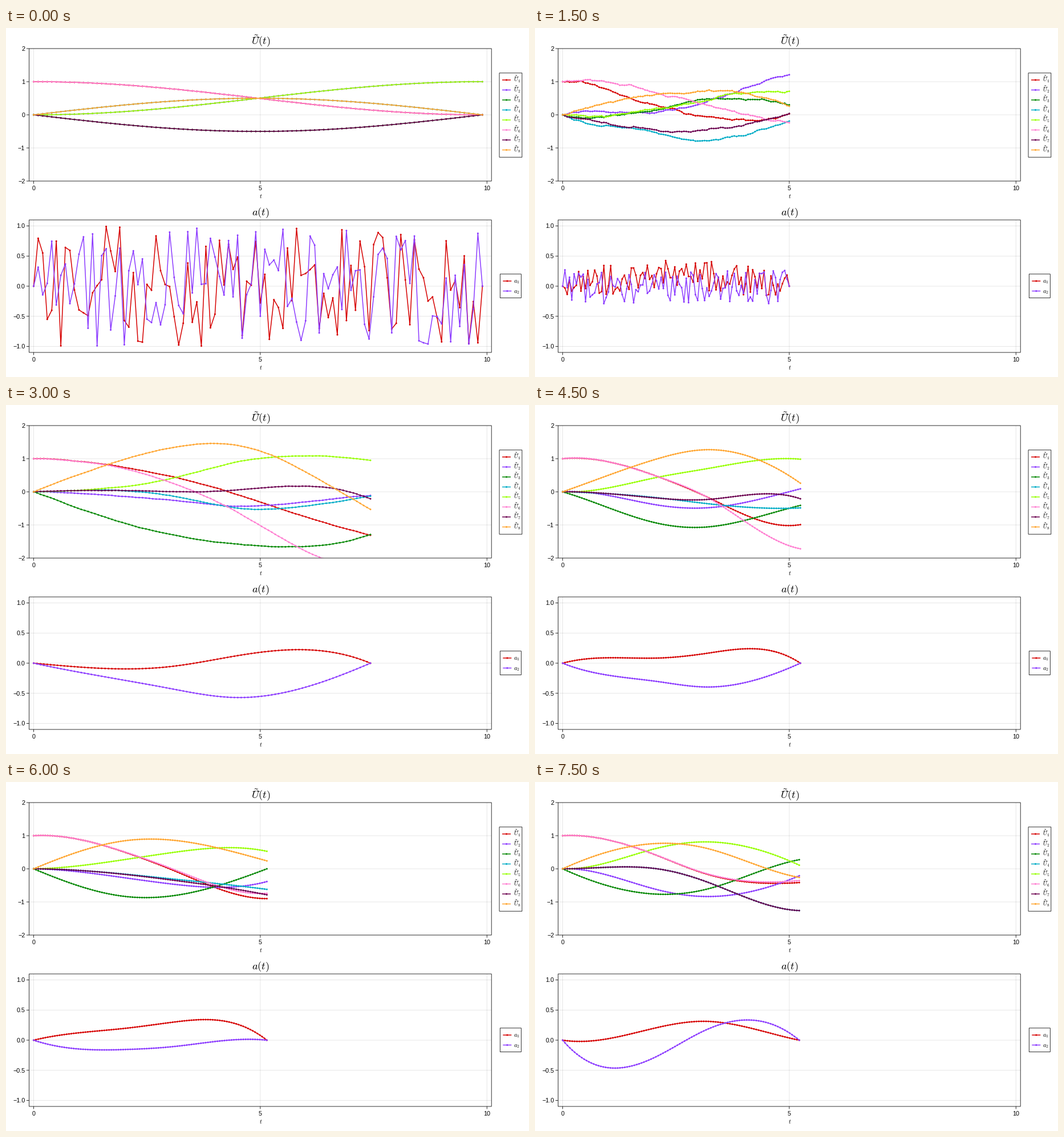
Recreate the animation shown at these times as a matplotlib script. Size 917x611 px, loop 8000 ms.

```python
import numpy as np
import matplotlib.pyplot as plt
from matplotlib.animation import FuncAnimation
from matplotlib.patches import Rectangle

plt.rcParams["font.family"] = "Liberation Sans"
plt.rcParams["mathtext.fontset"] = "cm"

W, H, DPI = 917, 611, 100
PX = 72 / DPI
N = 100
S = np.linspace(0, 1, N)
EDGE = 0.8 * PX
LINE, DOT = 1.5 * PX, (3 * PX) ** 2
COLORS = ["#d60000", "#8c3bff", "#018700", "#00acc6",
          "#97ff00", "#ff7ed1", "#6b004f", "#ffa52f"]
rng = np.random.default_rng(7)


def spline(*y):
    """Not-a-knot cubic spline through evenly spaced key points."""
    y = np.array(y)
    n = len(y)
    m, r = np.zeros((n, n)), np.zeros(n)
    m[0, :3] = m[-1, -3:] = 1, -2, 1
    for i in range(1, n - 1):
        m[i, i - 1:i + 2] = 1, 4, 1
        r[i] = 6 * (y[i - 1] - 2 * y[i] + y[i + 1])
    c = np.linalg.solve(m, r)
    u = S * (n - 1)
    k = np.minimum(u.astype(int), n - 2)
    b = u - k
    a = 1 - b
    return (a * y[k] + b * y[k + 1]
            + ((a**3 - a) * c[k] + (b**3 - b) * c[k + 1]) / 6)


def from_one(*y):
    return spline(1, *y)


def from_zero(*y):
    return spline(0, *y)


def control(*y):
    return spline(0, *y, 0)


def noise(mean, spread):
    y = mean * np.sin(np.pi * S) + rng.uniform(-spread, spread, N)
    y[[0, -1]] = 0
    return y


def wander(curves, step):
    """Add a random walk that starts and ends at zero."""
    walks = rng.normal(0, step, (len(curves), N)).cumsum(axis=1)
    walks -= walks[:, :1]
    return [c + w - S * w[-1] for c, w in zip(curves, walks)]


def paired(u1, u2, u3, u4, gaps):
    """The second column mirrors the first and drifts apart by the gaps."""
    second = [-u2, u1, u4, -u3]
    return [u1, u2, u3, u4] + [u + g * S**3 for u, g in zip(second, gaps)]


def guess():
    fall = (1 + np.cos(np.pi * S)) / 2
    bow = np.sin(np.pi * S) / 2
    return 9.9, [fall, 1 - fall, -bow, bow] * 1 + [
        1 - fall, fall, -bow, bow, noise(0, 1), noise(0, 1)]


def rough():
    curves = [from_one(.74, .34, .08, -.09, .03),
              from_zero(.08, .06, .27, .76, 1.21),
              from_zero(-.10, .08, .37, .46, .30),
              from_zero(-.33, -.46, -.68, -.52, -.19),
              from_zero(.06, .17, .40, .63, .71),
              from_one(.89, .67, .30, -.07, -.24),
              from_zero(-.26, -.39, -.35, -.26, .04),
              from_zero(.30, .58, .66, .62, .26)]
    return 5.0, wander(curves, .013) + [noise(.18, .25), noise(-.03, .28)]


def stretched():
    curves = [from_one(.85, .49, -.06, -.72, -1.31),
              from_zero(-.10, -.27, -.44, -.31, -.11),
              from_zero(-.73, -1.28, -1.57, -1.65, -1.29),
              from_zero(.04, -.12, -.49, -.44, -.13),
              from_zero(.10, .39, .88, 1.07, .95),
              from_one(.83, .31, -.59, -1.76, -2.25),
              from_zero(.05, .02, .07, .17, -.21),
              from_zero(.75, 1.29, 1.405, .65, -.53)]
    return 7.43, wander(curves, .003) + [control(-.085, -.06, .12, .224),
                                         control(-.215, -.415, -.57, -.41)]


def smooth():
    return 5.245, [from_one(.895, .46, -.13, -.79, -.99),
                   from_zero(-.12, -.40, -.485, -.27, .09),
                   from_zero(-.50, -.95, -1.065, -.80, -.41),
                   from_zero(-.06, -.18, -.35, -.475, -.485),
                   from_zero(.13, .44, .69, .93, .985),
                   from_one(.895, .46, -.13, -1.05, -1.72),
                   from_zero(-.06, -.19, -.235, -.08, -.21),
                   from_zero(.52, 1.0, 1.27, 1.03, .26),
                   control(.09, .085, .16, .24),
                   control(-.205, -.305, -.395, -.29)]


def calm():
    return 5.145, paired(from_one(.88, .48, -.05, -.62, -.90),
                         from_zero(-.095, -.28, -.465, -.56, -.385),
                         from_zero(-.53, -.84, -.81, -.49, 0),
                         from_zero(-.05, -.165, -.31, -.455, -.62),
                         (.145, .16, -.165, .24)) + [
        control(.125, .20, .30, .327), control(-.148, -.154, -.106, -.013)]


def settled():
    return 5.22, paired(from_one(.86, .40, -.14, -.41, -.415),
                        from_zero(-.21, -.63, -.835, -.68, -.21),
                        from_zero(-.53, -.765, -.63, -.16, .275),
                        from_zero(.05, 0, -.37, -.93, -1.26),
                        (-.10, .06, 0, .015)) + [
        control(.03, .21, .313, .195), control(-.46, -.265, .16, .333)]


STATES = [make() for make in (guess, rough, stretched, smooth, calm, settled)]

fig = plt.figure(figsize=(W / DPI, H / DPI), dpi=DPI, facecolor="white")
stage = fig.add_axes([0, 0, 1, 1], zorder=5)
stage.set(xlim=(0, W), ylim=(H, 0))
stage.axis("off")


def label(x, y, s, size, ha="center"):
    stage.text(x, y, s, fontsize=size * PX, ha=ha, va="baseline")


def rule(xs, ys):
    stage.plot(xs, ys, color="black", lw=EDGE, snap=False, solid_capstyle="butt")


def box(x, y, w, h, fill="none"):
    stage.add_patch(Rectangle((x, y), w, h, fc=fill, ec="black", lw=EDGE,
                              snap=False))


def panel(top, lim, ticks, fmt):
    left, width, height = 40.5, 810.7, 232
    base = top + height
    ax = fig.add_axes([left / W, 1 - base / H, width / W, height / H])
    ax.set(xlim=(-0.1, 10.1), ylim=(-lim, lim))
    ax.axis("off")
    box(left, top, width, height)
    for x in (0, 5, 10):
        px = left + (x + 0.1) / 10.2 * width
        ax.axvline(x, color="black", alpha=0.12, lw=EDGE, snap=False, zorder=1)
        rule([px, px], [base, base + 4.6])
        label(px, base + 16.3, str(x), 10.7)
    for v in ticks:
        py = top + height * (lim - v) / (2 * lim)
        ax.axhline(v, color="black", alpha=0.12, lw=EDGE, snap=False, zorder=1)
        rule([left - 4.6, left], [py, py])
        label(33.3, py + 3.8, fmt.format(v).replace("-", "\u2212"), 10.7, "right")
    label(446.5, base + 29.5, "$t$", 10.7)
    return ax


def legend(x, y, w, h, first, names):
    box(x, y, w, h, "white")
    for i, name in enumerate(names):
        ly = first + 17.5 * i
        mid = x + 12.5
        stage.plot([mid - 7.5, mid + 7.5], [ly, ly], color=COLORS[i], lw=LINE,
                   snap=False, solid_capstyle="butt")
        stage.scatter(mid, ly, s=DOT, color=COLORS[i], edgecolors="none", zorder=3)
        label(890, ly + 3.3, name, 10.4, "left")
        if "U" in name:
            label(894.8, ly - 3, r"$\rightarrow$", 5.6)


class Curve:
    """A line with a dot on every sample."""

    def __init__(self, ax, color, z):
        self.line, = ax.plot([], [], color=color, lw=LINE, snap=False, zorder=z)
        self.dots = ax.scatter([], [], s=DOT, color=color, edgecolors="none",
                               zorder=z)

    def set(self, t, y):
        self.line.set_data(t, y)
        self.dots.set_offsets(np.column_stack([t, y]))


top_ax = panel(36, 2, [-2, -1, 0, 1, 2], "{:d}")
low_ax = panel(336, 1.1, [-1, -0.5, 0, 0.5, 1], "{:.1f}")
label(447, 28, r"$\tilde{U}(t)$", 18.3)
label(438.5, 17.6, r"$\rightarrow$", 9.5)
label(446.5, 328, "$a(t)$", 18.3)
legend(865, 78.8, 39.8, 147.4, 91, [rf"$\tilde{{U}}_{i}$" for i in range(1, 9)])
legend(866.3, 430.8, 37, 41.7, 443, ["$a_1$", "$a_2$"])

curves = [Curve(top_ax, c, 2 + i) for i, c in enumerate(COLORS)]
curves += [Curve(low_ax, c, 2 + i) for i, c in enumerate(COLORS[:2])]


def draw(i):
    end, values = STATES[min(i // 3, len(STATES) - 1)]
    for curve, y in zip(curves, values):
        curve.set(end * S, y)
    return []


anim = FuncAnimation(fig, draw, frames=16, interval=500, repeat=True,
                     repeat_delay=0, init_func=lambda: draw(0))
plt.show()
```
